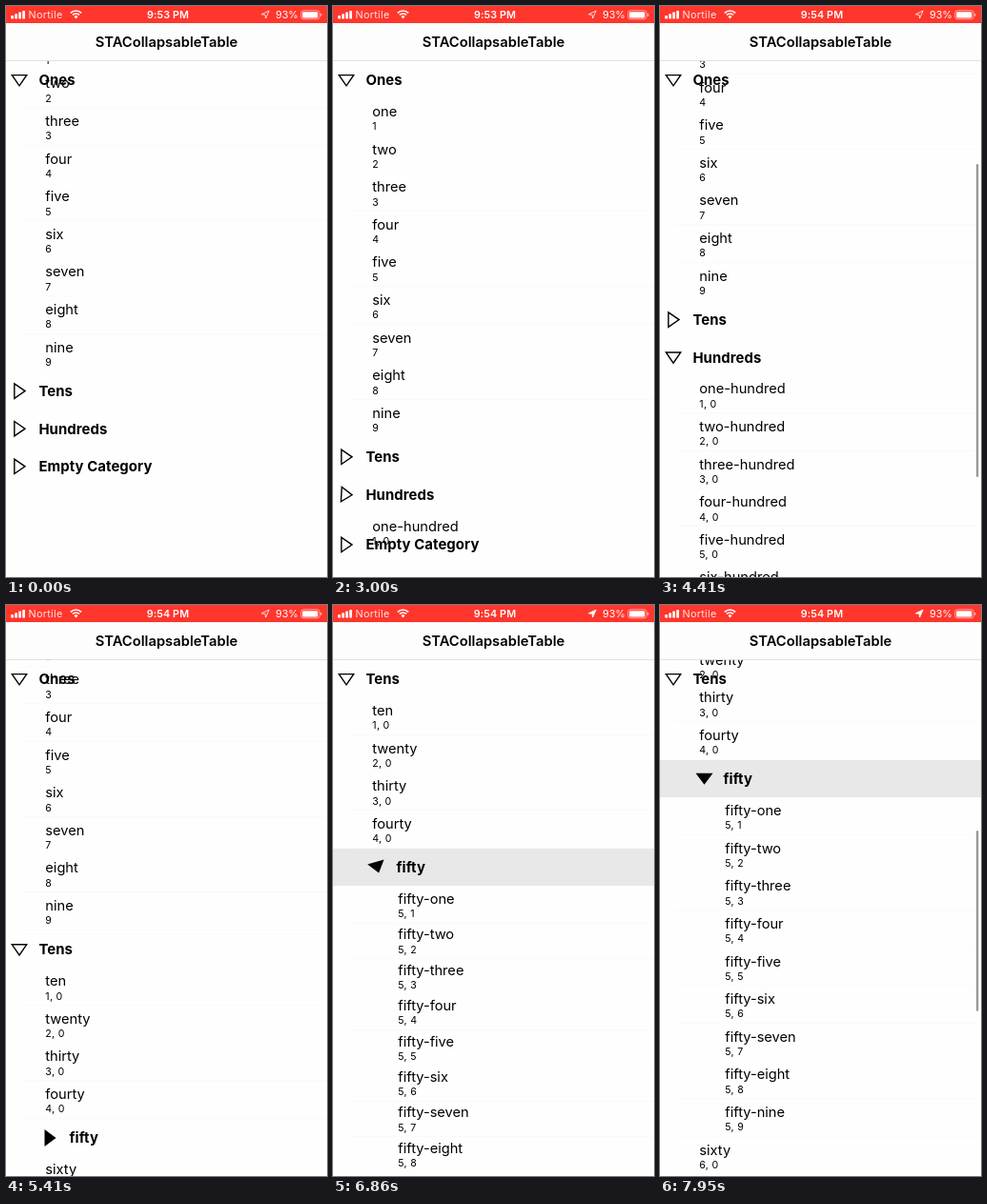
Animation of 337 by 600 pixels, one loop 8 s. Source, as an HTML page with a canvas:

```html
<!DOCTYPE html>
<html lang="en">
<head>
<meta charset="utf-8">
<title>Collapsable table</title>
<style>
html, body { margin: 0; width: 100%; height: 100%; overflow: hidden; background: #fefefe; }
canvas { display: block; width: 337px; height: 600px; }
</style>
</head>
<body>
<canvas id="stage"></canvas>
<script>
const W = 337, H = 600, LOOP = 8000;
const TOP = 57.6, ROW = 39.6, PAPER = '#fefefe';
const FONT = 'Inter, "Open Sans", sans-serif';
const canvas = document.getElementById('stage');
const ctx = canvas.getContext('2d');
const dpr = window.devicePixelRatio || 1;
canvas.width = W * dpr;
canvas.height = H * dpr;

const ones = 'one two three four five six seven eight nine'.split(' ');
const tens = 'ten twenty thirty fourty fifty sixty seventy eighty ninety'.split(' ');

// Moving stretches: start, end, number of distinct pictures
const bursts = [
  [50, 90, 2], [3000, 3680, 16], [4050, 4820, 17],
  [5140, 5770, 15], [6590, 7320, 17], [7770, 7950, 5]
];

function snap(t) {
  let out = 0;
  for (const [a, b, n] of bursts) {
    if (t < a) break;
    const step = (b - a) / (n - 1);
    out = t >= b ? b : a + Math.floor((t - a) / step + 0.1) * step;
  }
  return out;
}

function ease(t, start, length) {
  const x = Math.min(1, Math.max(0, (t - start) / length));
  return x * x * (3 - 2 * x);
}

function scrollAt(t) {
  if (t < 50) return 69.2;
  if (t < 90) return 17;
  return 328.8 * ease(t, 3330, 350)
    - 217 * ease(t, 4011, 497)
    + 284.2 * ease(t, 5420, 350)
    + 4 * ROW * ease(t, 6970, 350)
    - 159.3 * ease(t, 7731, 497);
}

function text(str, x, y, size, weight, color, spacing = 0, align = 'left') {
  ctx.font = `${weight} ${size}px ${FONT}`;
  ctx.letterSpacing = spacing + 'px';
  ctx.textAlign = align;
  ctx.fillStyle = color;
  ctx.fillText(str, x, y);
}

function box(x, y, w, h, r, color) {
  ctx.fillStyle = color;
  ctx.beginPath();
  ctx.roundRect(x, y, w, h, r);
  ctx.fill();
}

function triangle(x, y, turn, filled) {
  const base = filled ? 6 : 5.2, half = filled ? 9 : 7.7;
  ctx.save();
  ctx.translate(x, y);
  ctx.rotate(turn * Math.PI / 2);
  ctx.beginPath();
  ctx.moveTo(-base, -half);
  ctx.lineTo(-base, half);
  ctx.lineTo(6, 0);
  ctx.closePath();
  if (filled) {
    ctx.fillStyle = '#000';
    ctx.fill();
  } else {
    ctx.strokeStyle = '#000';
    ctx.lineWidth = 1.4;
    ctx.stroke();
  }
  ctx.restore();
}

function layout(t) {
  const hundredsOpen = ease(t, 2962, 330);
  const tensOpen = ease(t, 5080, 330);
  const fiftyOpen = ease(t, 6581, 330);
  const rows = [], heads = [];
  const start = TOP - scrollAt(t);
  let y = start;

  const head = (name, turn) => {
    heads.push({ name, turn, y });
    y += ROW;
  };
  const group = (items, open, indent) => {
    if (!open) return;
    const limit = open < 1 ? y + Math.max(ROW, items.length * ROW * open) : Infinity;
    for (const item of items) {
      rows.push({ ...item, y, indent, limit });
      y += ROW * open;
      if (item.parent) group(item.kids, fiftyOpen, 68.3);
    }
  };

  head('Ones', 1);
  group(ones.map((name, i) => ({ name, sub: `${i + 1}` })), 1, 41.3);
  head('Tens', tensOpen);
  group(tens.map((name, i) => i === 4
    ? {
        name, parent: true, turn: ease(t, 6622, 330), picked: t >= 6590,
        kids: ones.map((unit, k) => ({ name: 'fifty-' + unit, sub: `5, ${k + 1}` }))
      }
    : { name, sub: `${i + 1}, 0` }), tensOpen, 41.3);
  head('Hundreds', hundredsOpen);
  group(ones.map((name, i) => ({ name: name + '-hundred', sub: `${i + 1}, 0` })), hundredsOpen, 41.3);
  head('Empty Category', 0);
  return { rows, heads, total: y - start };
}

function drawRow(r) {
  const h = Math.min(ROW, r.limit - r.y);
  if (h <= 0 || r.y > H || r.y + ROW < TOP) return;
  ctx.save();
  ctx.beginPath();
  ctx.rect(0, r.y, W, h);
  ctx.clip();
  ctx.fillStyle = r.picked ? '#e8e8e8' : PAPER;
  ctx.fillRect(0, r.y, W, ROW);
  if (r.parent) {
    triangle(46.5, r.y + ROW / 2 + 0.3, r.turn, true);
    text(r.name, 66.5, r.y + 25.3, 14.9, 700, '#000', 0.05);
  } else {
    text(r.name, r.indent, r.y + 18.8, 14.65, 400, '#000');
    text(r.sub, r.indent, r.y + 33.1, 10.6, 400, '#000', 0.3);
  }
  if (!r.picked) {
    ctx.fillStyle = '#f9f9f9';
    ctx.fillRect(16, r.y + ROW - 0.8, W - 16, 0.8);
  }
  ctx.restore();
}

function drawHeads(heads) {
  heads.forEach((s, i) => {
    const next = heads[i + 1];
    const pinned = next ? Math.min(TOP, next.y - ROW) : TOP;
    const y = Math.max(s.y, pinned);
    if (y + ROW < TOP) return;
    triangle(14, y + ROW / 2 + 0.4, s.turn, false);
    text(s.name, 34.4, y + 25.5, 14.9, 700, '#000', 0.08);
  });
}

function drawScrollBar(t, total) {
  const alpha = t >= 7770 ? 1 : t >= 4050 ? 1 - ease(t, 4600, 220) : 0;
  if (!alpha) return;
  const size = 320800 / (total + 104);
  const y = 86.5 + scrollAt(t) / (total + TOP - H) * (510.5 - size);
  ctx.globalAlpha = alpha;
  box(332.1, y, 2.2, size, 1.1, '#949494');
  ctx.globalAlpha = 1;
}

function drawStatus(t) {
  ctx.fillStyle = '#ff362c';
  ctx.fillRect(0, 0, W, 18);
  for (let i = 0; i < 4; i++) {
    const h = 3.4 + i * 1.7;
    box(5.2 + i * 4, 13.4 - h, 2.8, h, 0.6, '#fff');
  }
  text('Nortile', 23.6, 13, 10.78, 400, '#ffe6e4', 0.3);

  // Wireless fan
  ctx.strokeStyle = '#fff';
  ctx.lineWidth = 1.7;
  for (const r of [5, 8]) {
    ctx.beginPath();
    ctx.arc(73.5, 13, r, -Math.PI * 0.75, -Math.PI * 0.25);
    ctx.stroke();
  }
  ctx.fillStyle = '#fff';
  ctx.beginPath();
  ctx.moveTo(73.5, 13.5);
  ctx.arc(73.5, 13, 2.8, -Math.PI * 0.75, -Math.PI * 0.25);
  ctx.fill();

  text(t < 3500 ? '9:53 PM' : '9:54 PM', 170, 13, 10.78, 600, '#fff', 0.1, 'center');

  // Location arrow
  ctx.beginPath();
  ctx.moveTo(276.2, 5);
  ctx.lineTo(272.6, 13);
  ctx.lineTo(272.1, 9.3);
  ctx.lineTo(268.3, 8.8);
  ctx.closePath();
  if (t >= 5590) ctx.fill();
  ctx.lineWidth = 0.8;
  ctx.lineJoin = 'round';
  ctx.stroke();
  ctx.lineJoin = 'miter';

  text('93%', 283, 13, 10.78, 400, '#fff');
  ctx.lineWidth = 0.8;
  ctx.strokeStyle = '#ffc4c0';
  ctx.beginPath();
  ctx.roundRect(309.8, 4.8, 19.4, 9, 2.4);
  ctx.stroke();
  box(311.2, 6.2, 16.2, 6.2, 1.2, '#fff');
  box(330.2, 7.8, 1.2, 3, 0.6, '#ffc4c0');
}

function draw(now) {
  const t = snap(now);
  const { rows, heads, total } = layout(t);
  ctx.setTransform(dpr, 0, 0, dpr, 0, 0);
  ctx.fillStyle = PAPER;
  ctx.fillRect(0, 0, W, H);
  rows.reverse().forEach(drawRow);
  drawHeads(heads);
  drawScrollBar(t, total);

  ctx.fillStyle = '#fdfdfd';
  ctx.fillRect(0, 18, W, TOP - 18);
  ctx.fillStyle = '#dcdcdc';
  ctx.fillRect(0, 57, W, 0.8);
  text('STACollapsableTable', 168.5, 43.3, 14.75, 600, '#000', 0, 'center');
  drawStatus(t);
}

function tick() {
  draw(performance.now() % LOOP);
  requestAnimationFrame(tick);
}
tick();
</script>
</body>
</html>
```
